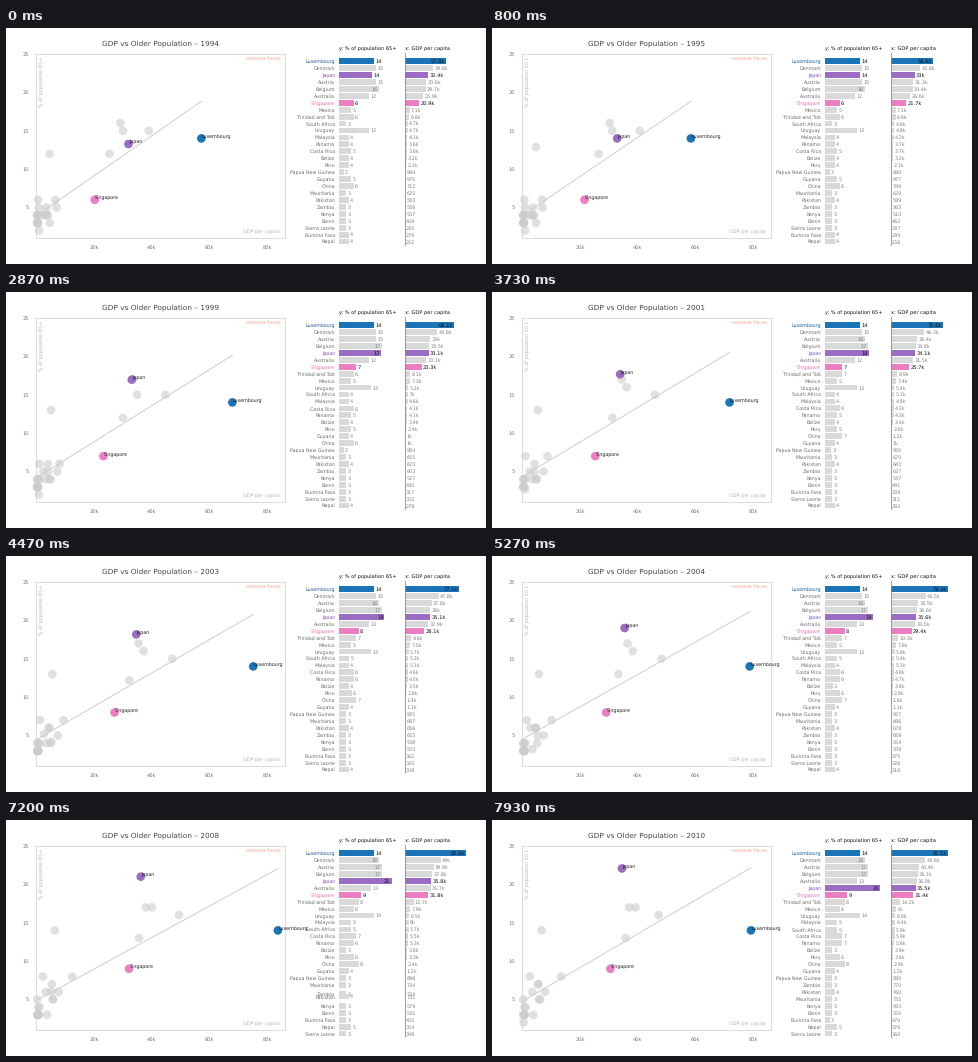
A matplotlib script that plays this animation: 480x236 px, repeating every 8 s.

```python
import numpy as np
import matplotlib.pyplot as plt
from matplotlib.animation import FuncAnimation
from matplotlib.patches import Rectangle

W, H, DPI = 480, 236, 100
FRAMES, LOOP = 160, 8000
YEAR_MS, LEAD = 500, 0.27
FIRST, LAST = 1993, 2010
YEARS = np.arange(FIRST, LAST + 1)

plt.rcParams.update({"font.family": "DejaVu Sans", "text.hinting": "none"})

# Share of people over 65 at both ends; GDP (k$) at a few turning points
TURNS = [1994, 1997, 1999, 2007, 2009]
RICH = {
    "Luxembourg": ((14.2, 14.8), (57.8, 60.1, 68.1, 86.1, 79.1)),
    "Denmark": ((15, 16.3), (39.8, 42.9, 44.8, 50.7, 47.2)),
    "Japan": ((13.72, 23.05), (32.4, 34.2, 33.1, 37.1, 34.5)),
    "Austria": ((15, 17.45), (30.6, 32.7, 35, 40.6, 39.2)),
    "Belgium": ((16.7, 17.9), (29.7, 31.8, 33.5, 38.5, 37)),
    "Australia": ((12.4, 13.45), (25.9, 28, 30.1, 35.6, 35.8)),
    "Singapore": ((6.21, 9.61), (20.9, 23.4, 23.3, 33, 30.5)),
}

# Share at both ends; GDP ($) at both ends of a growth curve
POOR = {
    "Mexico": ((5.2, 6.2), (7060, 8000)),
    "Trinidad and Tob": ((6.03, 8.45), (6750, 14200)),
    "South Africa": ((3.62, 5.98), (4740, 5900)),
    "Uruguay": ((12.85, 14.4), (4700, 6900)),
    "Malaysia": ((4.1, 5.2), (4100, 6400)),
    "Panama": ((4.6, 7.3), (3650, 5600)),
    "Costa Rica": ((5.2, 7.6), (3600, 5900)),
    "Belize": ((4.25, 3.85), (3200, 3900)),
    "Peru": ((4.62, 6.98), (2100, 3600)),
    "Papua New Guinea": ((2.52, 3.55), (994, 880)),
    "Guyana": ((5.05, 4.9), (970, 1200)),
    "Mauritania": ((3.2, 3.8), (625, 755)),
    "China": ((6, 8.72), (712, 2900)),
    "Zambia": ((3.2, 3.8), (556, 770)),
    "Pakistan": ((4.2, 4.8), (583, 760)),
    "Kenya": ((3.2, 3.8), (507, 593)),
    "Benin": ((3.2, 3.8), (459, 550)),
    "Sierra Leone": ((3.2, 3.8), (285, 360)),
    "Burkina Faso": ((4.15, 2.9), (279, 470)),
    "Nepal": ((4.2, 5.2), (252, 376)),
}

FOCUS = {"Luxembourg": "#1c74b8", "Japan": "#9a6cc4", "Singapore": "#ec7fc4"}
NAME_INK = {"Luxembourg": "#1c5f9c", "Japan": "#8450b4", "Singapore": "#e86db8"}
NAMES = list(RICH) + list(POOR)


def rich_gdp(points):
    vals = np.interp(YEARS, TURNS, points) * 1000
    vals[0] = 2 * vals[1] - vals[2]
    vals[-1] *= 1.03
    return vals


def poor_gdp(ends):
    start, end = ends
    t = (YEARS - 1994) / (LAST - 1994)
    return start * (end / start) ** (np.sign(t) * np.abs(t) ** 1.2)


GDP = np.array([rich_gdp(g) for _, g in RICH.values()]
               + [poor_gdp(g) for _, g in POOR.values()])
OLD = np.array([np.floor(np.linspace(*ends, len(YEARS)))
                for ends, _ in [*RICH.values(), *POOR.values()]])
RANK = np.argsort(np.argsort(-GDP, axis=0, kind="stable"), axis=0)


def px(gdp):
    return 30.2 + gdp * 0.002885


def py(share):
    return 26 + (25 - share) * 7.675


def money(v):
    if v < 995:
        return f"{v:.0f}"
    return f"{v / 1000:.1f}".removesuffix(".0") + "k"


fig = plt.figure(figsize=(W / DPI, H / DPI), dpi=DPI, facecolor="white")
ax = fig.add_axes([0, 0, 1, 1])
ax.set(xlim=(0, W), ylim=(H, 0))
ax.axis("off")


def put(x, y, s, size, color, ha="left", va="center_baseline", **kw):
    return ax.text(x, y, s, fontsize=size * 72 / DPI, color=color,
                   ha=ha, va=va, **kw)


def stroke(xs, ys, color, width, **kw):
    return ax.plot(xs, ys, color=color, lw=width * 72 / DPI, **kw)[0]


# Scatter frame and axis labels
ax.add_patch(Rectangle((30, 26), 248.5, 183.6, fill=False, ec="#dcdcdc",
                       lw=0.8))
for v in range(5, 26, 5):
    put(23.3, py(v), str(v), 5.1, "#777777", "right")
for v in range(20, 81, 20):
    put(px(v * 1000), 218.7, f"{v}k", 5.1, "#777777", "center")
put(275, 30.5, "remove focus", 5.15, "#f3a08e", "right")
put(274, 203.4, "GDP per capita", 4.9, "#b8b8b8", "right")
put(36, 29, "% of population 65+", 4.85, "#b8b8b8", "center", "top",
    rotation=90)
title = put(154.3, 14.9, "", 7.35, "#444444", "center")

trend = stroke([], [], "#cfcfcf", 1, zorder=2)
shades = [FOCUS.get(n, (0.8, 0.8, 0.8, 0.6)) for n in NAMES]
draw_order = sorted(range(len(NAMES)), key=lambda k: NAMES[k] in FOCUS)
dots = ax.scatter(np.zeros(len(NAMES)), np.zeros(len(NAMES)),
                  s=(8.6 * 72 / DPI) ** 2, linewidths=0, zorder=3,
                  c=[shades[k] for k in draw_order])
tags = {n: put(0, 0, n, 4.7, "#222222", va="baseline", zorder=4)
        for n in FOCUS}

# Bar charts
OLD_X, GDP_X, ROW, BAR_H = 332.5, 398.5, 6.94, 5.8
put(OLD_X + 0.3, 20.2, "y: % of population 65+", 5.05, "#111111")
put(GDP_X + 0.3, 20.2, "x: GDP per capita", 5.1, "#111111")
stroke([GDP_X] * 2, [25, 217], "#888888", 0.8, zorder=4)


class Bar:
    def __init__(self, x, scale, limit, name):
        self.x, self.scale, self.limit = x, scale, limit
        focus = name in FOCUS
        self.rect = ax.add_patch(Rectangle((x, 0), 0, BAR_H, lw=0, zorder=2,
                                           fc=FOCUS.get(name, "#d9d9d9")))
        self.text = put(0, 0, "", 5.1 if focus else 4.9,
                        "#111111" if focus else "#858585", zorder=5)

    def show(self, value, target, y, label):
        end = self.x + value * self.scale
        inside = target > self.limit
        self.rect.set_bounds(self.x, y - BAR_H / 2, end - self.x, BAR_H)
        self.text.set_text(label)
        self.text.set_ha("right" if inside else "left")
        self.text.set_position((end - 1 if inside else end + 1.3, y))


rows = [(put(329, 0, n, 4.75, NAME_INK.get(n, "#707070"), "right"),
         Bar(OLD_X, 2.53, 15.5, n), Bar(GDP_X, 0.00073, 55000, n))
        for n in NAMES]


def update(i):
    whole, p = divmod(i * LOOP / FRAMES / YEAR_MS + LEAD, 1)
    k = int(whole) + 1

    def blend(a):
        return a[:, k - 1] * (1 - p) + a[:, k] * p

    gdp, old, rank = blend(GDP), blend(OLD), blend(RANK)
    title.set_text(f"GDP vs Older Population – {FIRST + k}")

    xs, ys = px(gdp), py(old)
    dots.set_offsets(np.column_stack([xs, ys])[draw_order])
    slope, base = np.polyfit(gdp, old, 1)
    ends = np.array([gdp.min(), gdp.max()])
    trend.set_data(px(ends), py(base + slope * ends))
    for n, tag in tags.items():
        j = NAMES.index(n)
        tag.set_position((xs[j] + 0.4, ys[j] - 0.6))

    for j, (name, old_bar, gdp_bar) in enumerate(rows):
        y = 33.1 + rank[j] * ROW
        name.set_y(y)
        old_bar.show(old[j], OLD[j, k], y, f"{OLD[j, k]:.0f}")
        gdp_bar.show(gdp[j], GDP[j, k], y, money(GDP[j, k]))
    return []


anim = FuncAnimation(fig, update, frames=FRAMES, interval=LOOP / FRAMES,
                     init_func=lambda: update(0), repeat=True, repeat_delay=0)
plt.show()
```
